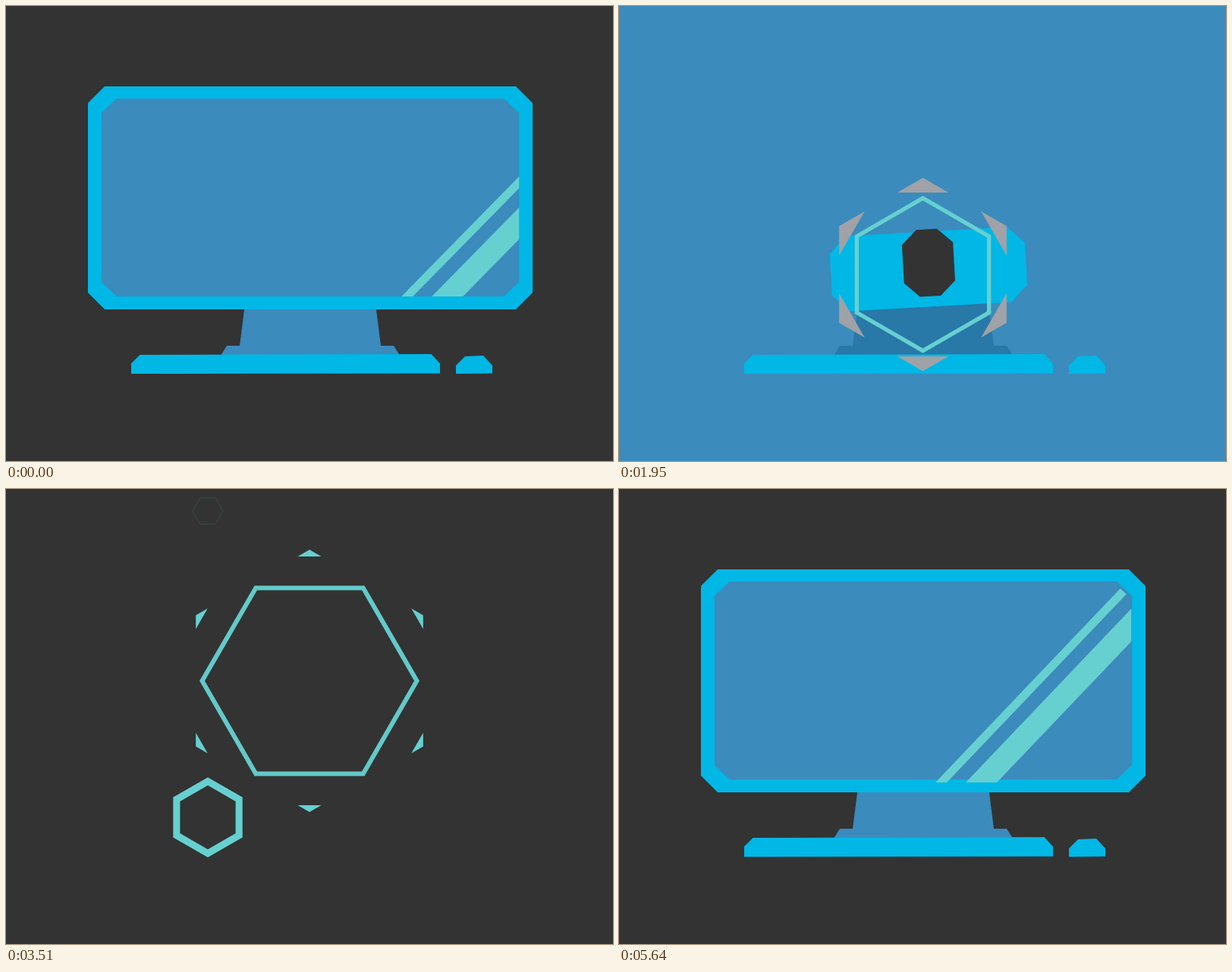
Recreate the animation shown at these times as an HTML page with a canvas. Size 800x600 px, loop 5.67 s.

```html
<!DOCTYPE html>
<html lang="en">
<head>
<meta charset="utf-8">
<title>Desktop loop</title>
<style>
html, body { margin: 0; height: 100%; overflow: hidden; background: #333; }
canvas { display: block; }
</style>
</head>
<body>
<canvas id="stage" width="800" height="600"></canvas>
<script>
const ctx = document.getElementById('stage').getContext('2d');
const LOOP = 5670, SWAP = 2800, LAG = 2940, FILLED = 330, LANDING = 1830;
const DARK = '#333333', BLUE = '#3b8bbd', CYAN = '#00b7e6', TEAL = '#66d0d0';
const SCENES = [
  { bg: DARK, screen: BLUE, stand: BLUE },
  { bg: BLUE, screen: DARK, stand: '#2878a8' }
];

const progress = (p, start, span) => Math.max(0, Math.min(1, (p - start) / span));
const out = (p, start, span) => 1 - (1 - progress(p, start, span)) ** 3;
// Ease out past the goal and back; a larger s swings further.
function pop(p, start, span, s = 1.7) {
  const v = progress(p, start, span) - 1;
  return 1 + (s + 1) * v ** 3 + s * v ** 2;
}

function trace(pts) {
  ctx.beginPath();
  pts.forEach(([x, y]) => ctx.lineTo(x, y));
  ctx.closePath();
}
function fill(pts, color) {
  trace(pts);
  ctx.fillStyle = color;
  ctx.fill();
}
const hexagon = (x, y, r, turn = 0, sy = 1) => Array.from({ length: 6 }, (_, i) => {
  const a = (i + turn) * Math.PI / 3;
  return [x + r * Math.cos(a), y + r * sy * Math.sin(a)];
});

// Rectangle with cut corners, centred and rotated.
function octagon(x, y, w, h, cx, cy, rot = 0) {
  const a = w / 2, b = h / 2, c = Math.cos(rot), s = Math.sin(rot);
  const m = a - Math.min(cx, a * .7), n = b - Math.min(cy, b * .7);
  return [[-m, -b], [m, -b], [a, -n], [a, n], [m, b], [-m, b], [-a, n], [-a, -n]]
    .map(([u, v]) => [x + u * c - v * s, y + u * s + v * c]);
}

function shine(p) {
  const k = 1 - progress(p, 2700, 100), early = Math.max(0, 2700 - p);
  const x = p - 2280 - 4 * k - early * early / 200, y = 383 + 4 * k;
  const rise = 300, run = rise / (1.02 + .03 * k);
  ctx.save();
  trace(octagon(401 - k, 252.5 + 4 * k, 550.5, 261, 20, 19));
  ctx.clip();
  for (const [a, b] of [[0, 15], [40, 81]])
    fill([[x + a, y], [x + b, y], [x + b + run, y - rise], [x + a + run, y - rise]], TEAL);
  ctx.restore();
}

// Swells on landing, then snaps tall, then wide.
function monitor(p, color) {
  const swell = out(p, LANDING, 400), tilt = 1 - out(p, 1950, 300);
  const tall = pop(p, 2080, 350, 3.3), wide = pop(p, 2265, 300), open = pop(p, 2240, 340);
  const x = 401 + 7 * tilt, rot = -.057 * tilt;
  fill(octagon(x, 253 + 95 * tilt, 390 * swell + 196 * wide, 150 * swell + 144 * tall, 22, 22, rot), CYAN);
  fill(octagon(x, 252.5 + 87 * tilt, 102 * swell + 448.5 * open, 134 * swell + 127 * tall, 20, 19, rot), color);
  if (p > 2350) shine(p);
}

function stand(p, color) {
  const s = pop(p, 1230, 330);
  const right = [[85, 385], [93, 448], [110, 448], [117.5, 460]].map(([x, y]) => [x, 460 + (y - 460) * s]);
  const left = right.map(([x, y]) => [-x, y]).reverse();
  fill([...right, ...left].map(([x, y]) => [401 + x, y]), color);
}

// Low block with cut upper corners; lean raises its left shoulder.
function slab(l, r, top, cut, lean = 0) {
  fill([[l + cut, top - lean], [r - cut, top - 1 - lean / 4], [r, top + cut], [r, 484.5],
    [l, 485], [l, top + cut - lean]], CYAN);
}
function keyboard(p) {
  const l = 165 - 585 * (1 - pop(p, 740, 440, .6)), lag = 592 * (1 - out(p, 740, 543));
  slab(l, 572 - lag, 460, 11.5, Math.min(4, lag / 8));
}
function mouse(p) {
  const d = 230 * (1 - out(p, 760, 395));
  slab(593 + d, 641 + d, 462, 12);
}

// Leaps from the keyboard over the top edge and drops back.
function seed(p, color) {
  if (p > LANDING) return;
  const u = progress(p, 1075, LANDING - 1075);
  const y = 460 - 115 * u - 470 * (1 - (2 * u - 1) ** 4);
  fill(hexagon(400.8, y, 18 * out(p, 1000, 75), 0, 1.13), color);
}

// Expanding hexagon outline and six flying corner pieces.
function burst(p, { x, y, at, span = 500, r = 0, w = 10, turn = .5, tips = 0, depth = 0, tint = TEAL }) {
  const u = progress(p, at, span), e = out(p, at, span);
  if (u <= 0 || u >= 1) return;
  if (r) {
    ctx.globalAlpha = Math.min(1, (1 - u) * 1.6);
    trace(hexagon(x, y, r * e, turn));
    ctx.lineWidth = Math.min(r * e, w * (1 - u));
    ctx.strokeStyle = TEAL;
    ctx.stroke();
    ctx.globalAlpha = 1;
  }
  if (!tips) return;
  const d = depth * (1 - u), half = d * Math.sqrt(3), far = tips * e;
  for (let i = 0; i < 6; i++) {
    ctx.save();
    ctx.translate(x, y);
    ctx.rotate(i * Math.PI / 3);
    fill([[0, -far], [half, d - far], [-half, d - far]], tint);
    ctx.restore();
  }
}
const BURSTS = [
  { x: 579, y: 298, at: -130, r: 40 },
  { x: 266, y: 29, at: 120, r: 20, turn: 0 },
  { x: 400, y: 253, at: 370, r: 180, turn: 0, tips: 220, depth: 15 },
  { x: 266, y: 433, at: 420, r: 72, w: 13 },
  { x: 529.5, y: 474, at: 976, span: 400, tips: 47, depth: 9.5, tint: '#66cc99' },
  { x: 400.5, y: 354, at: 1822, span: 400, r: 146, w: 8, tips: 185, depth: 28.7, tint: '#a0a2a7' }
];

function draw(t) {
  const half = t < SWAP ? 0 : 1;
  const p = half ? t - LAG : t < 600 ? t * 740 / 600 - 140 : t;
  const leaving = p < FILLED, scene = SCENES[leaving ? half : 1 - half];
  const q = leaving ? p + LAG : p;
  ctx.fillStyle = scene.bg;
  ctx.fillRect(0, 0, 800, 600);
  stand(q, scene.stand);
  keyboard(q);
  mouse(q);
  seed(q, scene.screen);
  if (q > LANDING) {
    // The screen swells until it becomes the next backdrop.
    const zoom = leaving ? 1 + 3 * progress(p, -40, FILLED + 40) ** 2 : 1;
    ctx.save();
    ctx.translate(400, 253);
    ctx.scale(zoom, zoom);
    ctx.translate(-400, -253);
    monitor(q, scene.screen);
    ctx.restore();
  }
  BURSTS.forEach(b => burst(p, b));
}

const start = performance.now();
function tick() {
  draw((performance.now() - start) % LOOP);
  requestAnimationFrame(tick);
}
tick();
</script>
</body>
</html>
```
